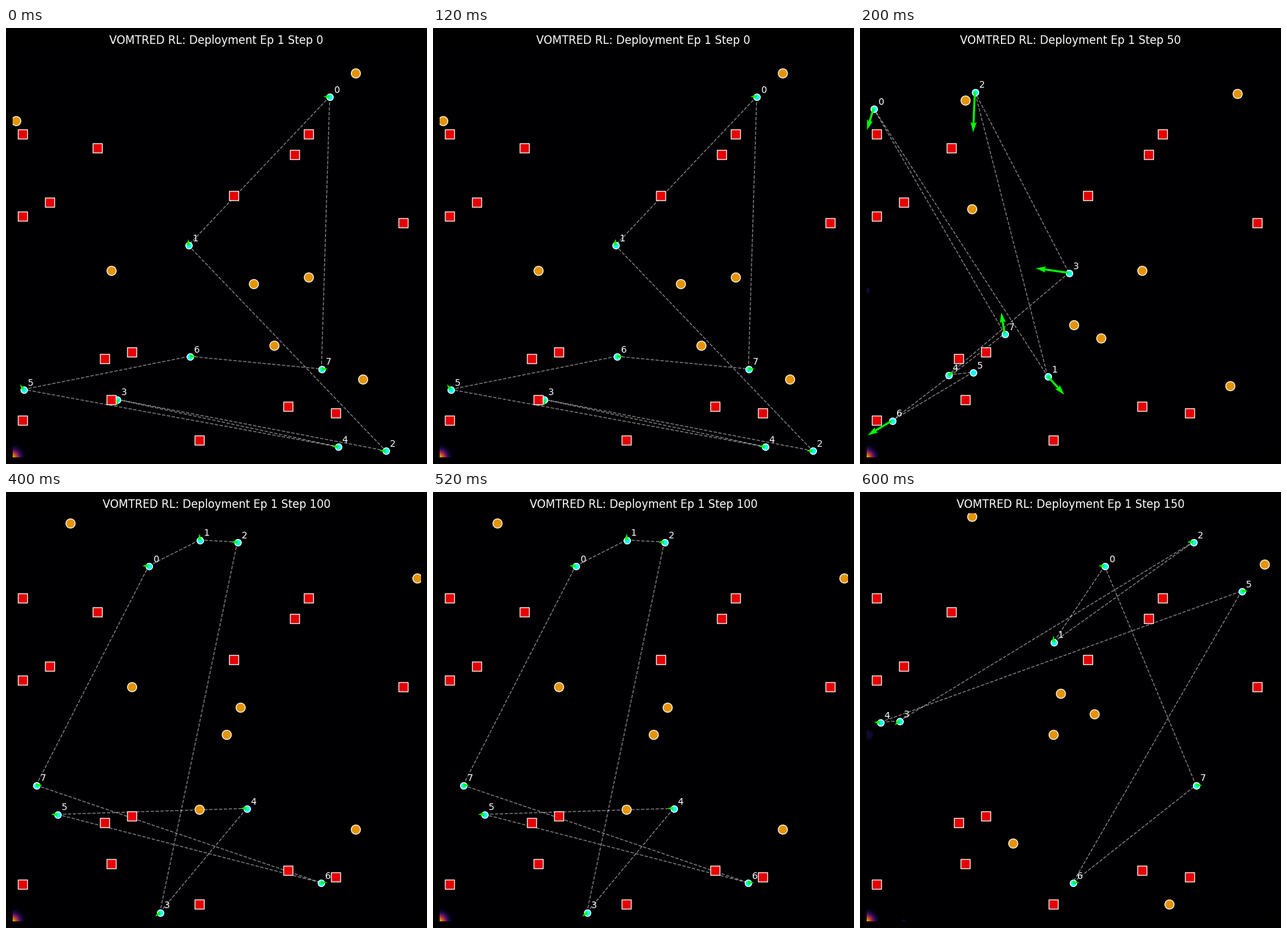
A matplotlib script for the animation above (800 ms loop, 636 by 658 pixels).

```python
import numpy as np
import matplotlib.pyplot as plt
from matplotlib.animation import FuncAnimation

WIDTH, HEIGHT, DPI = 636, 658, 100
LEFT, RIGHT, TOP, BOTTOM = 10, 626, 32, 648
CELL = (RIGHT - LEFT) / 60
STEPS_PER_FRAME = 50
SHORT = 9.5  # arrow length of a slow agent

OBSTACLES = [(1, 5), (1, 35), (1, 47), (5, 37), (12, 45), (13, 14), (14, 8),
             (17, 15), (27, 2), (32, 38), (40, 7), (41, 44), (43, 47),
             (47, 6), (57, 34)]

MOVERS = [
    [(50, 56), (0, 49), (14, 27), (35, 25), (43, 26), (38, 16), (51, 11)],
    [(54, 53), (14, 52), (15, 36), (40, 27), (30, 19), (34, 17), (53, 10)],
    [(8, 58), (59, 50), (17, 34), (33, 31), (31, 27), (27, 16), (50, 13)],
    [(15, 59), (58, 52), (28, 33), (33, 30), (27, 27), (21, 11), (44, 2)],
]

AGENTS = [
    [(489, 103.5), (275.5, 328), (573.5, 638), (167.5, 560.5),
     (501.5, 632), (26.5, 545.5), (277.5, 495.5), (476.5, 514.5)],
    [(20.5, 121.5), (283.5, 525.5), (173.5, 96.5), (315.5, 369.5),
     (133.5, 523.5), (170.5, 519.5), (48.5, 592.5), (218.5, 461.5)],
    [(215.5, 111.5), (292.5, 72.5), (349.5, 75.5), (232.5, 634.5),
     (363.5, 477.5), (77.5, 486.5), (475.5, 589.5), (45.5, 442.5)],
    [(369.5, 111.5), (292.5, 226.5), (503.5, 75.5), (59.5, 345.5),
     (30.5, 347.5), (576.5, 149.5), (321.5, 589.5), (507.5, 442.5)],
]

HEADINGS = [
    [180, 90, 180, -85, 175, 125, 0, 0],
    [253, -48, 267.6, 172, 25, 0, 211, 99],
    [180, 90, 180, 222, 180, 180, 0, 0],
    [180, 90, 180, 222, 180, 0, 0, 0],
]
SPEEDS = [[SHORT] * 8, [34, 37.5, 61, 50.5, SHORT, 0, 43, 32.5],
          [SHORT] * 8, [SHORT] * 8]

# Faint spots in the density field: x, y, radius
SPOTS = [[], [(11, 396, 4.5)], [], [(12, 366.5, 8), (66, 647, 2.5)]]


def cell_centers(cells):
    i, j = np.array(cells).T
    return LEFT + (i + 0.5) * CELL, BOTTOM - (j + 0.5) * CELL


def density(spots):
    x, y = np.meshgrid(np.arange(LEFT, RIGHT) + 0.5,
                       np.arange(TOP, BOTTOM) + 0.5)
    field = 0.85 * np.exp(-((x - LEFT)**2 + (y - BOTTOM)**2) / (2 * 7.5**2))
    for cx, cy, radius in spots:
        field += 0.1 * np.exp(-(np.hypot(x - cx, y - cy) / radius)**6)
    return field


def draw_cells(cells, marker, color):
    ax.scatter(*cell_centers(cells), s=100, marker=marker, c=color,
               edgecolors="white", linewidths=1, alpha=0.9, zorder=5)


def draw(frame):
    ax.clear()
    ax.axis("off")
    ax.imshow(density(SPOTS[frame]), cmap="inferno", vmin=0, vmax=1,
              alpha=0.85, aspect="auto", interpolation="nearest",
              extent=(LEFT, RIGHT, BOTTOM, TOP))
    ax.set(xlim=(LEFT, RIGHT), ylim=(BOTTOM, TOP))

    agents = np.array(AGENTS[frame])
    for start, end in zip(agents, np.roll(agents, -1, axis=0)):
        ax.plot(*zip(start, end), "--", color="white", alpha=0.5, lw=1,
                zorder=2)
    ax.scatter(*agents.T, s=50, c="cyan", edgecolors="white", linewidths=1,
               zorder=3)

    angle = np.radians(HEADINGS[frame])
    speed = np.array(SPEEDS[frame])
    moving = speed > 0
    u, v = speed * np.cos(angle), -speed * np.sin(angle)
    ax.quiver(*agents[moving].T, u[moving], v[moving], color="lime",
              angles="xy", scale_units="xy", scale=1, width=0.005, zorder=4)

    draw_cells(OBSTACLES, "s", "red")
    draw_cells(MOVERS[frame], "o", "orange")
    for k, (x, y) in enumerate(agents):
        ax.text(x + 6.2, y - 6, str(k), color="white", fontsize=10, zorder=6)
    ax.set_title(f"VOMTRED RL: Deployment Ep 1 Step {frame * STEPS_PER_FRAME}",
                 color="white", fontsize=12)


plt.rcParams["font.family"] = "DejaVu Sans"
fig = plt.figure(figsize=(WIDTH / DPI, HEIGHT / DPI), dpi=DPI,
                 facecolor="black")
ax = fig.add_axes([LEFT / WIDTH, 1 - BOTTOM / HEIGHT,
                   (RIGHT - LEFT) / WIDTH, (BOTTOM - TOP) / HEIGHT])
anim = FuncAnimation(fig, draw, frames=4, init_func=lambda: None,
                     interval=200, repeat=True, repeat_delay=0)
plt.show()
```
